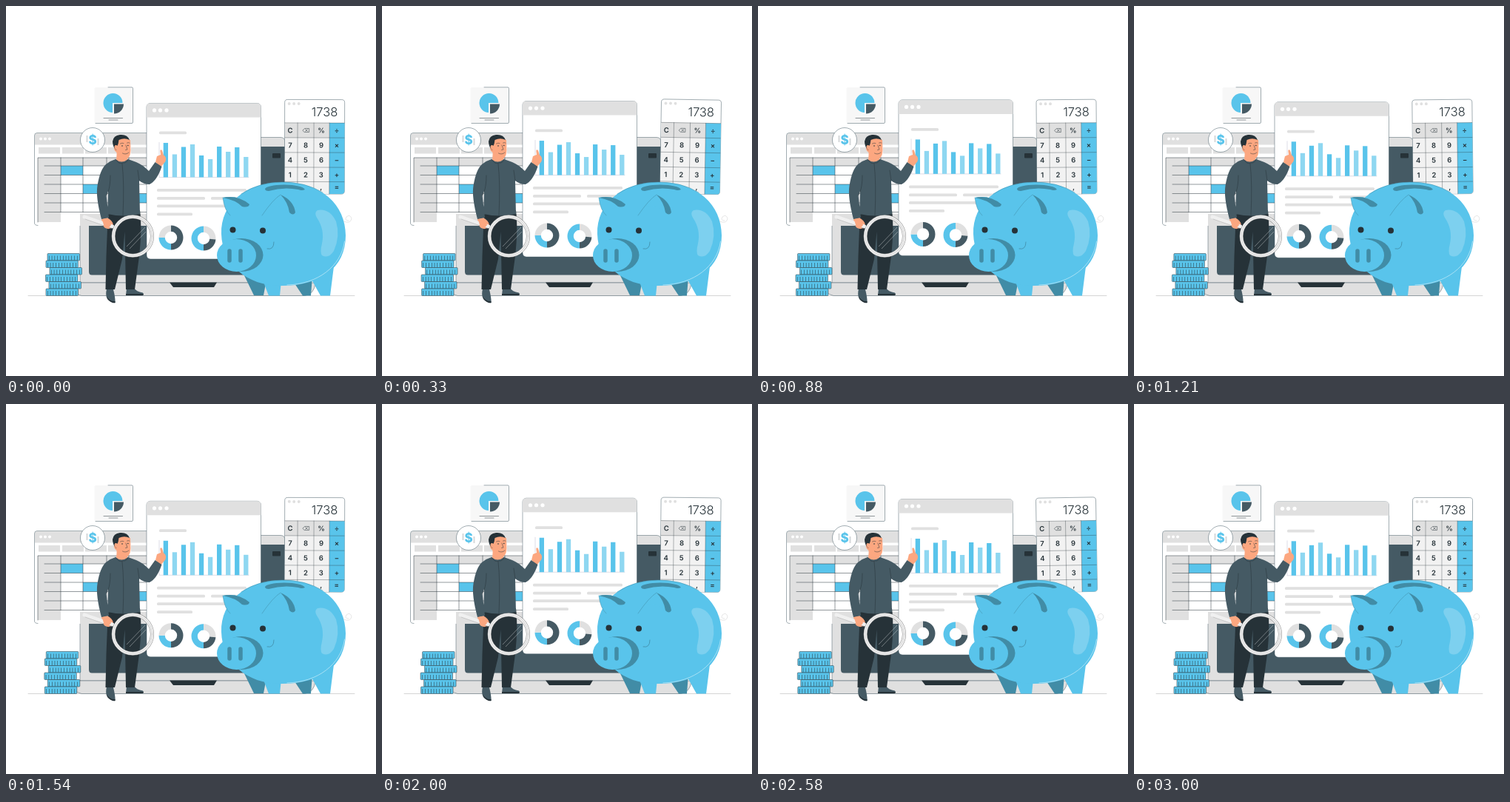
Animation of 500 by 500 pixels, one loop 3.04 s. Source, as an HTML page:

```html
<!DOCTYPE html>
<html lang="en">
<head>
<meta charset="utf-8">
<title>Savings</title>
<style>
  html, body { margin: 0; width: 100%; height: 100%; overflow: hidden; background: #fff; }
  svg { display: block; width: 100vw; height: 100vh; }
  text { font-family: Inter, "Open Sans", sans-serif; text-anchor: middle; fill: #263238; }
  .b { fill: #59c4eb; } .l { fill: #8ed7f1; } .d { fill: #455a64; } .k { fill: #263238; }
  .g { fill: #e0e0e0; } .w { fill: #fff; } .s { fill: #fca780; } .t { fill: #418ca6; }
  .o { stroke: #455a64; stroke-width: .5; }
  .n { fill: none; stroke: #263238; stroke-width: .5; stroke-linecap: round; stroke-linejoin: round; }
</style>
</head>
<body>
<svg viewBox="0 0 500 500">
  <path class="n" d="M30 391.500H471" style="stroke:#aaa"/>

  <!-- laptop -->
  <path class="g o" d="M100 374V184Q100 177.500 107 177.500H371Q377 177.500 377 184V374Z"/>
  <path class="d" d="M112 190H377V363.500H116Q112 363.500 112 359Z"/>
  <rect class="k" x="360" y="199" width="11" height="6.500" rx="1"/>
  <path class="g o" d="M88 374H418Q417 389 404 391.500H102Q89 389 88 374Z"/>
  <path class="k" d="M221 373.500H285L281 380H226Z"/>

  <!-- spreadsheet window -->
  <path class="g" d="M100 280H190V297H100Z"/>
  <path class="w" d="M42 171.500H190V281H100V297H42Q38.500 297 38.500 293V175Q38.500 171.500 42 171.500Z"/>
  <path class="g" d="M42 172H190V187.500H39V175Q39 172 42 172Z"/>
  <path class="n" d="M190 171.500H42Q38.500 171.500 38.500 175V293Q38.500 296.500 43 296.500" style="stroke:#455a64"/>
  <g id="tabs" class="g"></g>
  <path class="g" d="M43 205H190V216H74V292H43Z"/>
  <path class="b" d="M74 216H104V228.500H74ZM104 241H136V253.500H104ZM166 253.500H190V266H166Z"/>
  <path class="n" id="grid"/>

  <!-- pie card -->
  <rect x="119.500" y="110" width="52" height="48.500" rx="2" fill="#f7f7f7"/>
  <path class="n" d="M138 109.800H170Q171.500 109.800 171.500 111.500V157Q171.500 158.500 170 158.500H121" style="stroke:#455a64"/>
  <path class="b" d="M144 131V144A13 13 0 1 1 157.500 131Z"/>
  <path class="d" d="M146 132.500H159A13 13 0 0 1 146 145.500Z"/>
  <path class="n" d="M132 151.500H157.500M139 154H151"/>

  <!-- dollar badge -->
  <circle class="w o" cx="117" cy="181" r="16.500"/>
  <path d="M109.500 175V184M124.500 179V188" stroke="#d5d8da" stroke-width="2"/>
  <text x="117" y="187.300" font-size="17" font-weight="800" style="fill:#59c4eb">$</text>

  <g id="coins"></g>

  <!-- report sheet -->
  <g id="sheet">
    <rect class="w o" x="190" y="132" width="154.500" height="210.500" rx="5"/>
    <path class="g" d="M190 151V137Q190 132 195 132H339.500Q344.500 132 344.500 137V151Z"/>
    <path class="n" d="M207 185V232H328" style="stroke:#bbc"/>
    <g id="report"></g>
  </g>

  <!-- calculator -->
  <g id="calc">
    <rect class="w o" x="376.500" y="126.500" width="81" height="127.500" rx="4"/>
    <path fill="#f2f2f2" d="M377 158H437V254H377Z"/>
    <path class="g" d="M377 158H437V178H377Z"/>
    <path class="b" d="M437 158H457.500V250Q457.500 254 453 254H437Z"/>
    <path class="n" d="M377 158H457M377 178H457M377 198H457M377 218H457M377 237.500H457M394 158V254M416 158V254M437 158V254" style="stroke-width:.35"/>
    <g class="g"><circle cx="382.500" cy="132" r="2"/><circle cx="389" cy="132" r="2"/><circle cx="395.500" cy="132" r="2"/></g>
    <text x="430.500" y="149" font-size="16.500" font-weight="300">1738</text>
    <path class="n" d="M401 168L403.500 165.500H409.500V170.500H403.500ZM404.500 166.700L407.500 169.400M407.500 166.700L404.500 169.400"/>
    <g id="keys" font-size="9.500" font-weight="600"></g>
  </g>

  <!-- man -->
  <path class="d" d="M136 382Q134 392 137 395Q142 402 147.500 401Q148 395 145 383ZM163 381H173Q176 386 185 387.500Q187 390.500 184 391H162Z"/>
  <path class="k" d="M135.500 392Q141 400 147.500 399V401Q142 402 137 396ZM162 389H186Q186 391 184 391H162Z"/>
  <path class="k" d="M138 276H181Q184 300 180 338L174 383H162L160.500 305L157 342L147 383H134.500L135.500 338Z"/>
  <path class="s" d="M129 286Q136 284 141 289Q145 292 145 298Q140 303 134 300Q129 296 129 286Z"/>
  <path class="s" d="M202 211L204 203L209 201L208.300 195.500Q209.500 193 211 195.500L213 201.500Q217.500 204 215.500 210L209 218Z"/>
  <path class="s" d="M150 195H164V211Q157 216 149 209Z"/>
  <path class="d" d="M148 207Q156 214 165 207L176 211Q184 214 193 223L201.500 211L210.500 217Q204 236 194 241Q186 241 180 236L181 281Q160 286 137 281L138 250L135.500 256L139 286L129 288Q121 258 123.500 243Q127 221 135 214Q141 209 148 207Z"/>
  <path class="n" d="M148 207Q153 215 158 212Q163 213 165 207M157 213Q160 240 158 283M141 229Q141 243 138 251L135.500 256M180 236L178 222"/>
  <path class="s" d="M147 182Q156 175 168 181L168.500 195Q168 207 160 207Q151 207 149.500 198Q144 194 147 188Z"/>
  <path class="k" d="M144 183Q145 175 154 174Q164 173 167 181Q160 177.500 152.500 181Q152 186 150.500 189L149 195Q144 190 144 183Z"/>
  <path class="s" d="M151 189Q146.500 186 146.500 191Q148 195 151 194.500Z"/>
  <g class="k"><circle cx="157" cy="189" r=".8"/><circle cx="164.800" cy="188.500" r=".8"/></g>
  <path class="n" d="M154.500 186Q157 184.500 159 185.500M163.500 185Q165 184 167 185M162 188L164 194L161.500 194.500M157.500 199Q162 201.500 166 198"/>

  <!-- magnifier -->
  <path d="M106 285L144 298" fill="none" stroke="#f0f0f0" stroke-width="5" stroke-linecap="round"/>
  <path class="n" d="M107 288L143 300.500" style="stroke:#aaa"/>
  <path class="s" d="M130 289Q135 285 140 290L142 296Q138 302 133 299Z"/>
  <path d="M163 325L188 299M167 328L189 305" stroke="#fff" stroke-width=".8" opacity=".45"/>
  <circle cx="171.300" cy="311" r="26.200" fill="none" stroke="#888" stroke-width="5"/>
  <circle cx="171.300" cy="311" r="26.200" fill="none" stroke="#f0f0f0" stroke-width="4"/>
  <circle class="n" cx="171.300" cy="311" r="26.200" style="stroke:#bbb"/>

  <!-- piggy bank -->
  <path class="n" d="M456 291Q466 295 467 287Q465 281 460 285Q457 290 463 290" style="stroke:#ccc"/>
  <path class="t" d="M319 358L335 391H348L352 370ZM388 372L401 391.500H412L414 365Z"/>
  <path class="b" d="M343 360L355 391.500H370L372 372ZM412 368L425 391.500H438L443 352Z"/>
  <path class="b" d="M291 308C290 267 324 238 373 238C425 237 459 268 459 310C459 354 425 378 373 378C327 379 292 350 291 308Z"/>
  <path class="n" d="M457.500 318C453 352 421 376 380 377" style="stroke:#c6ebf8;stroke-width:.7"/>
  <path class="n" d="M318 254Q342 238 373 238Q405 238 428 252" style="stroke:#418ca6"/>
  <path class="t" d="M350 247Q353 242 376 241.500Q400 242 404 248Q400 250 395 248Q375 244 355 250Q350 250 350 247Z"/>
  <path class="b" d="M293 259Q313 255 329 268Q328 273 319 272Q309 272 303 283Q295 276 293 259Z"/>
  <path class="t" d="M293 259Q313 255 329 268Q328 273 319 271Q310 262 293 259Z"/>
  <path class="b" d="M371 255Q389 263 391 279Q388 284 382 279Q372 269 357 271Q360 262 371 255Z"/>
  <path class="t" d="M371 255Q389 263 391 279Q388 284 383 279Q381 265 371 255Z"/>
  <path class="n" d="M293 259Q295 276 303 283M371 255Q361 261 346 283" style="stroke:#418ca6"/>
  <path fill="#7dd0ef" d="M421 276Q437 273 446 291Q452 311 443 331Q436 342 427 337Q424 333 427 321Q431 302 420 286Q416 279 421 276Z"/>
  <g class="k"><circle cx="306.500" cy="302.500" r="4"/><circle cx="347" cy="303.500" r="4"/></g>
  <path class="n" d="M362 319Q362 330 353 328" style="stroke:#418ca6;stroke-width:.8"/>
  <ellipse class="t" cx="318" cy="336.500" rx="29.500" ry="22.500"/>
  <ellipse class="b" cx="311.500" cy="337" rx="26.500" ry="22"/>
  <path d="M302 331V344M317 331V344" stroke="#418ca6" stroke-width="5.500" stroke-linecap="round"/>
</svg>
<script>
const $ = id => document.getElementById(id);
const rect = (cls, x, y, w, h, r = 0) => `<rect class="${cls}" x="${x}" y="${y}" width="${w}" height="${h}" rx="${r}"/>`;
const dots = (xs, y, r) => xs.map(x => `<circle class="w" cx="${x}" cy="${y}" r="${r}"/>`).join('');

$('tabs').innerHTML = dots([47, 53, 59], 179.5, 1.9) +
  [44, 76, 107, 138, 169].map((x, i) => rect('g', x, 191, i < 4 ? 29 : 21, 8.5)).join('');
$('grid').setAttribute('d', 'M43 292V205H190' +
  [216, 228.5, 241, 253.5, 266, 278.5].map(y => `M52 ${y}H190`).join('') +
  [74, 104, 136, 166].map(x => `M${x} 205V278.5`).join(''));

$('coins').innerHTML = [56, 54, 59, 53.5, 58, 54].map((x, i) => {
  const y = 334.5 + i * 9.5;
  return `<rect class="b" x="${x}" y="${y}" width="43.5" height="9.5" rx="1" stroke="#263238" stroke-width=".5"/>
    <path d="M${x + 2} ${y + 6}H${x + 42}" stroke="#263238" stroke-width="6" stroke-dasharray=".5 3.3"/>`;
}).join('');

// Ring segments: [class, start, end] in degrees clockwise from the top
const ring = (cx, cy, parts) => parts.map(([cls, a, b]) => {
  const at = (deg, r) => {
    const q = deg * Math.PI / 180;
    return `${cx + r * Math.sin(q)} ${cy - r * Math.cos(q)}`;
  };
  const big = +(b - a > 180);
  return `<path class="${cls}" d="M${at(a, 16.5)}A16.5 16.5 0 ${big} 1 ${at(b, 16.5)}L${at(b, 8.2)}A8.2 8.2 0 ${big} 0 ${at(a, 8.2)}Z"/>`;
}).join('');

$('report').innerHTML = dots([200.5, 208.5, 217], 141.5, 2.6) +
  [[207, 170, 37], [204, 247.5, 121], [204, 258.5, 65], [277, 258.5, 48], [204, 269, 116], [204, 280, 48]]
    .map(([x, y, w]) => rect('g', x, y, w, 3.8, 1.5)).join('') +
  [46.5, 31, 41, 44.5, 29.5, 24.5, 41.5, 34.5, 40.5, 27.5]
    .map((h, i) => rect(i % 2 ? 'l' : 'b', 212.7 + i * 12.05, 232 - h, 6.3, h)).join('') +
  ring(223, 313.5, [['d', 0, 180], ['b', 180, 270], ['g', 270, 360]]) +
  ring(267, 314.5, [['g', 0, 95], ['d', 95, 180], ['b', 180, 360]]);

$('keys').innerHTML = ['C %÷', '789×', '456−', '123+', '  ,='].map((row, r) =>
  [...row].map((c, i) => c === ' ' ? '' :
    `<text x="${384 + i * 21}" y="${[171.5, 191.5, 211.5, 231.5, 248][r]}">${c}</text>`).join('')).join('');

const LOOP = 3040, HALF = LOOP / 2;
const drift = [[0, 0], [300, -.3], [850, -2.6], [1540, -1.7], [2100, -1.4], [2580, -.2], [LOOP, 0]];

// Linear interpolation through [time, value] points
function along(points, t) {
  const i = Math.max(1, points.findIndex(p => p[0] >= t));
  const [a, b] = [points[i - 1], points[i]];
  return a[1] + (b[1] - a[1]) * (t - a[0]) / (b[0] - a[0]);
}

function draw(now) {
  const t = now % LOOP;
  const p = (t + 60) % HALF / HALF;
  const lift = 1 - Math.abs(2 * p - 1);
  const tilt = along([[0, 0], [.25, 1], [.75, -1], [1, 0]], p);
  $('sheet').setAttribute('transform', `translate(0 ${-6.7 * lift})`);
  $('calc').setAttribute('transform', `rotate(${tilt} 417 190)`);
  $('coins').setAttribute('transform', `translate(${along(drift, t)} 0)`);
}

const start = performance.now();
function tick() {
  draw(performance.now() - start);
  requestAnimationFrame(tick);
}
tick();
</script>
</body>
</html>
```
